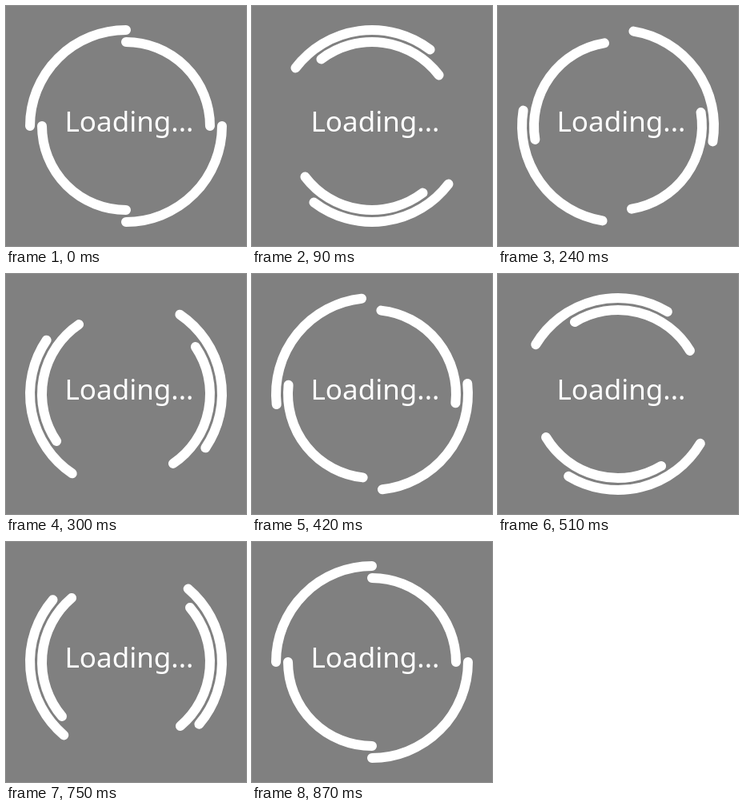
Recreate the animation shown at these times as an HTML page. Size 300 px wide and 300 px high, loop 0.9 s.

```html
<!DOCTYPE html>
<html lang="en">
<head>
<meta charset="utf-8">
<title>Loading</title>
<style>
  html, body { margin: 0; width: 100%; height: 100%; overflow: hidden; background: #808080; }
  svg { display: block; width: 100%; height: 100%; }
  path { fill: none; stroke: #fff; stroke-width: 12; stroke-linecap: round; }
  text { fill: #fff; font: 35px "Noto Sans", sans-serif; }
</style>
</head>
<body>
<svg viewBox="0 0 300 300">
  <path id="outer" d="M30 150A120 120 0 0 1 150 30M270 150A120 120 0 0 1 150 270"/>
  <path id="inner" d="M150 45A105 105 0 0 1 255 150M150 255A105 105 0 0 1 45 150"/>
  <text x="73.5" y="157">Loading...</text>
</svg>
<script>
  const LOOP = 900, STEP = 30;
  const TURN = 360 / (LOOP / STEP - 1); // first and last step share one pose
  const outer = document.getElementById("outer");
  const inner = document.getElementById("inner");

  const rotate = (el, deg) => el.setAttribute("transform", `rotate(${deg} 150 150)`);

  function draw(ms) {
    const angle = Math.floor((ms % LOOP) / STEP) * TURN;
    rotate(outer, angle);
    rotate(inner, -angle);
  }

  function tick() {
    draw(performance.now());
    requestAnimationFrame(tick);
  }
  tick();
</script>
</body>
</html>
```
